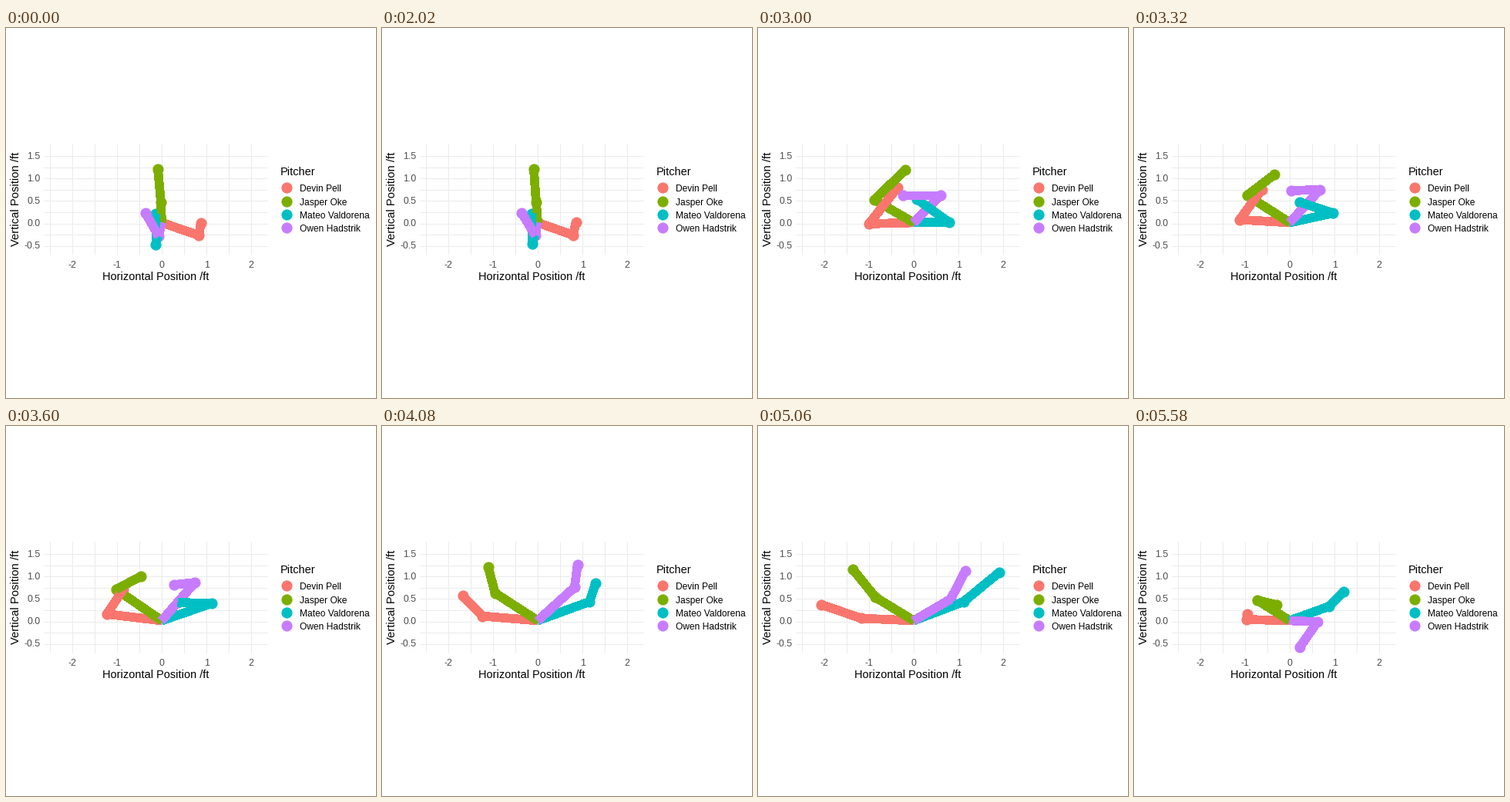
Write a matplotlib script that moves like this. It is 480x480 px and loops after 7600 ms.

```python
import numpy as np
import matplotlib.pyplot as plt
from matplotlib.animation import FuncAnimation

SIZE, DPI = 480, 80
PT = 72 / DPI            # points per pixel
FRAMES, INTERVAL = 380, 20
PAUSE, LAST = 100, 179   # held frames at the start, last moving step
ORIGIN = (202, 252.5)
UNIT = 58.1              # pixels per foot

plt.rcParams["font.family"] = "Liberation Sans"

# Set, lift, cock, release and finish of the throw, as steps.
MOMENTS = [0, 50, 80, 135, LAST]
# Per pitcher: elbow and wrist in stage pixels at each moment.
ARMS = [
    ("Devin Pell", "#F8766D",
     [(250, 269), (144, 254), (131, 244), (130, 249), (146, 251)],
     [(253, 253), (181, 207), (152, 212), (62, 228), (147, 244)]),
    ("Jasper Oke", "#7CAE00",
     [(201, 226), (151, 223), (143, 212), (150, 221), (160, 226)],
     [(197, 183), (191, 184), (175, 195), (104, 172), (185, 232)]),
    ("Mateo Valdorena", "#00BFC4",
     [(194, 281), (248, 252), (267, 230), (271, 226), (253, 234)],
     [(194, 241), (206, 222), (223, 229), (326, 182), (272, 215)]),
    ("Owen Hadstrik", "#C77CFF",
     [(198, 270), (237, 217), (245, 203), (254, 215), (238, 254)],
     [(181, 240), (188, 217), (218, 206), (286, 157), (215, 287)]),
]


def linear(u):
    return u


def ease_out(u):
    return 1 - (1 - u) ** 1.3


def ease_in(u):
    return u ** 1.6


EASES = [linear, linear, ease_out, ease_in]


def to_x(feet):
    return ORIGIN[0] + UNIT * feet


def to_y(feet):
    return ORIGIN[1] - UNIT * feet


def joint_at(path, step):
    i = min(np.searchsorted(MOMENTS, step, side="right"), len(EASES)) - 1
    start, end = MOMENTS[i:i + 2]
    u = EASES[i]((step - start) / (end - start))
    return [a + (b - a) * u for a, b in zip(path[i], path[i + 1])]


fig = plt.figure(figsize=(SIZE / DPI, SIZE / DPI), dpi=DPI, facecolor="white")
ax = fig.add_axes([0, 0, 1, 1])
ax.set(xlim=(0, SIZE), ylim=(SIZE, 0))
ax.axis("off")


def label(x, y, text, size, color="black", **kwargs):
    ax.text(x, y, text, fontsize=size * PT, color=color, **kwargs)


def dots(x, y, color):
    return ax.plot(x, y, "o", color=color, ms=14.2 * PT, mew=0,
                   antialiased=False, zorder=2)[0]


def bone(color, zorder):
    return ax.plot([], [], color=color, lw=10.7 * PT, antialiased=False,
                   solid_capstyle="butt", zorder=zorder)[0]


def draw_panel():
    grid = dict(colors="#EBEBEB", linewidths=1.07 * PT, zorder=1)
    ax.vlines(to_x(np.arange(-2.5, 2.1, 0.5)), 150, 294, **grid)
    # Shifted so that each line snaps to the pixel row holding its value.
    ax.hlines(to_y(np.arange(-0.5, 1.6, 0.25)) + 1, 49, 339, **grid)
    for v in range(-2, 3):
        label(to_x(v), 311, f"{v}", 12.4, "#4D4D4D", ha="center")
    for v in np.arange(-0.5, 1.6, 0.5):
        label(44.5, to_y(v) + 4.5, f"{v:.1f}", 12.4, "#4D4D4D", ha="right")
    label(194, 327, "Horizontal Position /ft", 14.5, ha="center")
    label(13, 222, "Vertical Position /ft", 14.8, rotation=90,
          ha="center", va="center")


def draw_legend():
    label(356, 191, "Pitcher", 14.5)
    for i, (name, color, *_) in enumerate(ARMS):
        y = 207.3 + 17.28 * i
        dots([363.5], [y], color)
        label(381, y + 5.2, name, 12)


draw_panel()
draw_legend()
parts = [(elbow, wrist, dots([], [], color), bone(color, 3), bone(color, 4))
         for _, color, elbow, wrist in ARMS]


def update(frame):
    step = min(max(frame - PAUSE, 0), LAST)
    artists = []
    for elbow, wrist, joints, upper, fore in parts:
        e, w = joint_at(elbow, step), joint_at(wrist, step)
        joints.set_data(*zip(e, w))
        upper.set_data(*zip(ORIGIN, e))
        fore.set_data(*zip(e, w))
        artists += [joints, upper, fore]
    return artists


anim = FuncAnimation(fig, update, frames=FRAMES, interval=INTERVAL,
                     init_func=lambda: update(0), repeat=True, repeat_delay=0)
plt.show()
```
